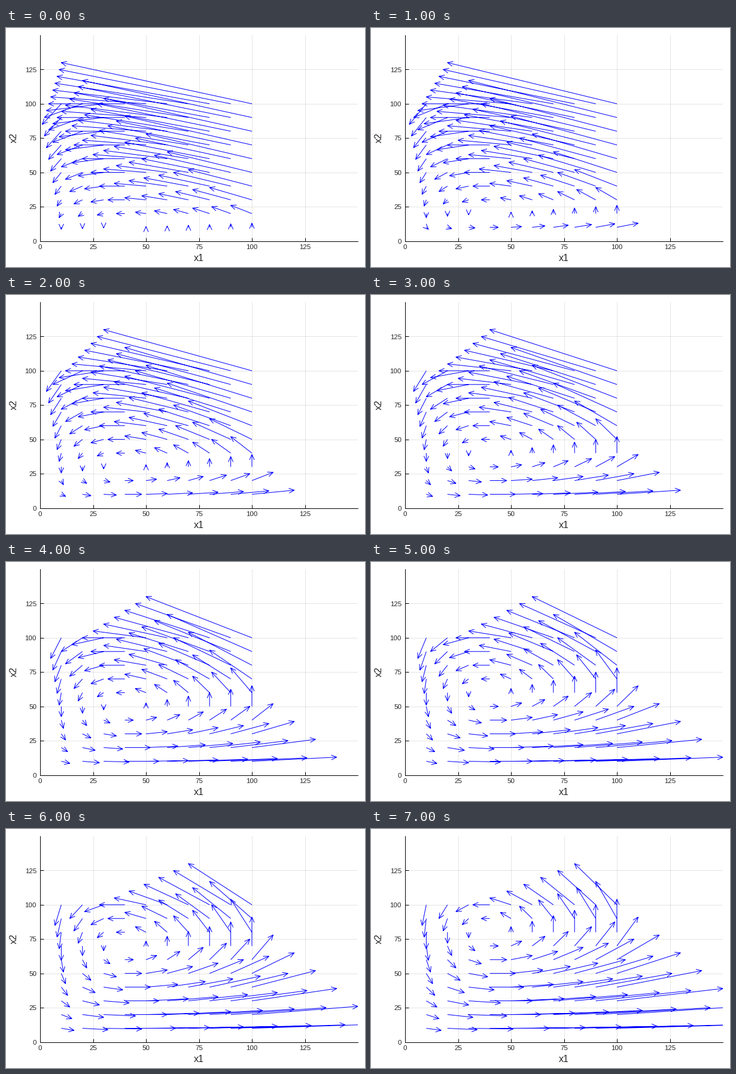
A matplotlib script that plays this animation: 600x400 px, repeating every 8000 ms.

```python
import numpy as np
import matplotlib.pyplot as plt
from matplotlib.animation import FuncAnimation

W, H, DPI = 600, 400, 100
LEFT, RIGHT, TOP, BOTTOM = 57, 588, 12, 356.5
LIMIT = 150
PX = 72 / DPI  # points per pixel
SCALE = np.array([RIGHT - LEFT, BOTTOM - TOP]) / LIMIT  # pixels per unit
HEAD_LENGTH, HEAD_HALF_WIDTH = 9, 4

plt.rcParams["font.family"] = "Liberation Sans"
plt.rcParams["path.simplify"] = False

fig = plt.figure(figsize=(W / DPI, H / DPI), dpi=DPI, facecolor="white")
ax = fig.add_axes([LEFT / W, 1 - BOTTOM / H,
                   (RIGHT - LEFT) / W, (BOTTOM - TOP) / H])
ax.set_xlim(0, LIMIT)
ax.set_ylim(0, LIMIT)
ax.set_axisbelow(True)

ticks = range(0, LIMIT, 25)
ax.set_xticks(ticks)
ax.set_yticks(ticks)
ax.tick_params(direction="in", length=6 * PX, width=PX, labelsize=11.5 * PX)
ax.set_xticklabels([])
ax.set_yticklabels([])
ax.grid(color="black", alpha=0.1, linewidth=PX)
for side in ("top", "right"):
    ax.spines[side].set_visible(False)
for side in ("left", "bottom"):
    ax.spines[side].set_linewidth(PX)


def label(x, y, text, size, **kw):
    """Place text at pixel (x, y), measured from the top left."""
    fig.text(x / W, 1 - y / H, text, fontsize=size * PX, color="#262626", **kw)


for t in ticks:
    label(LEFT + t * SCALE[0], 370.3, str(t), 11.5, ha="center", va="baseline")
    label(51, BOTTOM - t * SCALE[1] + 4.1, str(t), 11.5,
          ha="right", va="baseline")
label(322, 390, "x1", 16, ha="center", va="baseline")
label(21, 184, "x2", 16, ha="right", va="center", rotation=90)

arrows, = ax.plot([], [], color="blue", linewidth=PX,
                  solid_joinstyle="round", solid_capstyle="butt")

steps = np.arange(10, 101, 10)
starts = np.array([(x, y) for x in steps for y in steps], float)


def flow(points, balance):
    """Predator-prey velocity with equilibrium at (40, balance)."""
    x, y = points.T
    return np.column_stack([0.01 * x * (balance - y), 0.005 * y * (x - 40)])


def arrow_path(points, moves):
    """Shafts and open heads as one line broken by NaN rows."""
    gap = np.full(2, np.nan)
    rows = []
    for start, move in zip(points, moves):
        length = np.hypot(*(move * SCALE))
        if length < 1e-6:
            continue
        ux, uy = move * SCALE / length
        tip = start + move
        back = HEAD_LENGTH * np.array([ux, uy])
        side = HEAD_HALF_WIDTH * np.array([-uy, ux])
        rows += [start, tip, gap,
                 tip + (side - back) / SCALE, tip,
                 tip - (side + back) / SCALE, gap]
    return np.array(rows).T


def update(i):
    arrows.set_data(*arrow_path(starts, flow(starts, 10 * (i + 1))))
    return arrows,


anim = FuncAnimation(fig, update, frames=8, interval=1000,
                     repeat=True, repeat_delay=0, blit=False)
plt.show()
```
